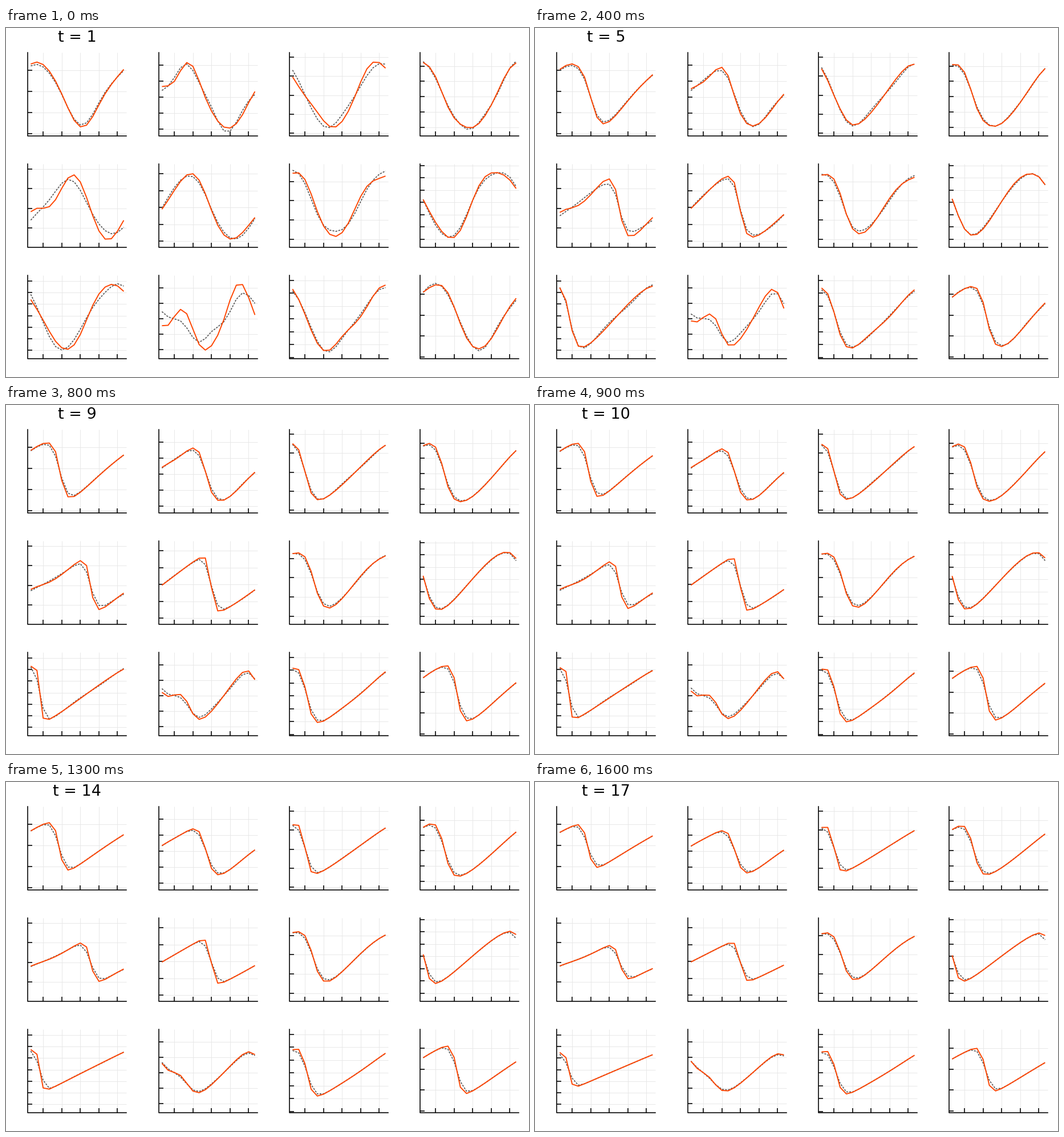
These frames come from a looping animation (917 by 611 pixels, 2000 ms). A matplotlib script:

```python
import matplotlib.pyplot as plt
import numpy as np
from matplotlib.animation import FuncAnimation

W, H, DPI = 917, 611, 64
PX = 72 / DPI                       # points per pixel
LEFTS, TOPS = (38, 268, 497, 726), (43, 238, 433)
PW, PH = 173, 146                   # panel size
POINTS, FINE = 16, 4                # samples per curve, solver cells per sample
SAMPLE = np.arange(POINTS)
LAST = 17                           # final time, then a hold
SPEED, VISCOSITY, SUBSTEPS = 0.43, 0.11, 8
FADE = 4                            # decay time of the model's early error

fig = plt.figure(figsize=(W / DPI, H / DPI), dpi=DPI, facecolor="white")
ax = fig.add_axes([0, 0, 1, 1])
ax.set_xlim(0, W)
ax.set_ylim(H, 0)
ax.axis("off")

panels = []


def stroke(xs, ys, color="black", width=1.6, cap="butt", **kw):
    return ax.plot(xs, ys, color=color, lw=width * PX,
                   solid_capstyle=cap, **kw)[0]


def neighbours(u):
    return np.roll(u, 1), np.roll(u, -1)


def burgers(keys, rate):
    """Periodic viscous Burgers flow, started from a smooth curve through keys."""
    cells = POINTS * FINE
    spectrum = np.fft.rfft(keys)
    spectrum[-1] /= 2
    u = np.fft.irfft(spectrum, cells) * cells / len(keys)
    states = [u[::FINE]]
    dt = 1 / SUBSTEPS
    for _ in range(LAST - 1):
        for _ in range(SUBSTEPS):
            left, right = neighbours(u)
            advect = rate * FINE * (right**2 - left**2) / 4
            diffuse = VISCOSITY * FINE**2 * (left - 2 * u + right)
            u = u + dt * (diffuse - advect)
        states.append(u[::FINE])
    return states


def predict(u, t, ripple):
    """Model curve: a fading ripple at first, later a smoothed solution."""
    amp, waves, peak = ripple
    early = np.exp(-(t - 1) / FADE)
    left, right = neighbours(u)
    smooth = (left + 2 * u + right) / 4
    wave = amp * np.cos(2 * np.pi * waves * (SAMPLE - peak) / POINTS)
    return early * (u - wave) + (1 - early) * smooth


def panel(col, row, zero, gap, unit, keys, ripple):
    """zero: y of the value 0; gap: pixels per tick; unit: value per tick."""
    left, top = LEFTS[col], TOPS[row]
    right, bottom = left + PW, top + PH
    xticks = left + 27 + 32.5 * np.arange(5)
    yticks = zero + gap * np.arange(-5, 6)
    grid = dict(color="#e6e6e6", width=0.9, zorder=1)
    for x in xticks:
        stroke([x, x], [top, bottom], **grid)
        stroke([x, x], [bottom, bottom - 8], zorder=2)
    for y in yticks[(yticks > top) & (yticks < bottom)]:
        stroke([left, right], [y, y], **grid)
        stroke([left, left + 8], [y, y], zorder=2)
    stroke([left, left, right], [top, bottom, bottom], cap="projecting", zorder=2)

    xs = left + 5.4 + 10.87 * SAMPLE
    dashed = stroke(xs, 0 * xs, "#595959", 1.7, zorder=3,
                    linestyle=(0, (1.9, 1.2)), dash_capstyle="butt")
    solid = stroke(xs, 0 * xs, "#ff4500", 1.9, zorder=4)
    states = burgers(keys, SPEED * unit / gap)
    panels.append((solid, dashed, zero, states, ripple))


# keys: starting heights in pixels at every second sample
# ripple: height, waves per period, position of a peak
panel(0, 0, 111, 37, 0.5, [48, 47, 18, -29, -62, -44, -4, 26], (4.2, 1, 1.7))
panel(1, 0, 120.5, 28, 0.25, [18, 27, 60, 28, -25, -53, -47, -10], (7.4, 3, -0.3))
panel(2, 0, 117.5, 33.1, 0.5, [32, -1, -30, -55, -46, -4, 46, 57], (12, 2, 4.2))
panel(3, 0, 120.3, 26.9, 0.25, [60, 35, -18, -48, -54, -33, 8, 50], (3, 3, 1.8))
panel(0, 1, 315.6, 34.3, 0.5, [-6, 0, 15, 53, 46, -13, -54, -40], (15, 2, -0.2))
panel(1, 1, 314.3, 29.5, 0.5, [-3, 30, 57, 48, -5, -48, -53, -31], (5.3, 2, 5.5))
panel(2, 1, 302.2, 33.7, 0.25, [48, 37, -19, -59, -56, -16, 25, 39], (9, 2, 2.8))
panel(3, 1, 305.3, 21.5, 0.25, [5, -35, -61, -49, 4, 45, 52, 39], (5, 2, 2))
panel(0, 2, 503.5, 20.15, 0.5, [28, -8, -45, -59, -33, 18, 50, 52], (10, 2, 3.5))
panel(1, 2, 509.2, 27.1, 0.25, [-12, 4, 9, -45, -47, -1, 59, 37], (25, 2, 3.8))
panel(2, 2, 509, 22.5, 0.25, [52, 8, -43, -55, -31, -9, 21, 54], (4.5, 2, -0.9))
panel(3, 2, 502.6, 36.6, 0.5, [40, 53, 39, -15, -55, -54, -23, 15], (3.6, 3, 4))

title = ax.text(LEFTS[0] + PW / 2, 24, "", ha="center", va="baseline",
                family="DejaVu Sans", size=27 * PX, color="black")


def draw(frame):
    t = min(frame + 1, LAST)
    title.set_text(f"t = {t}")
    artists = [title]
    for solid, dashed, zero, states, ripple in panels:
        u = states[t - 1]
        solid.set_ydata(zero - u)
        dashed.set_ydata(zero - predict(u, t, ripple))
        artists += [solid, dashed]
    return artists


anim = FuncAnimation(fig, draw, frames=20, interval=100, repeat=True,
                     repeat_delay=0, blit=False)
plt.show()
```
